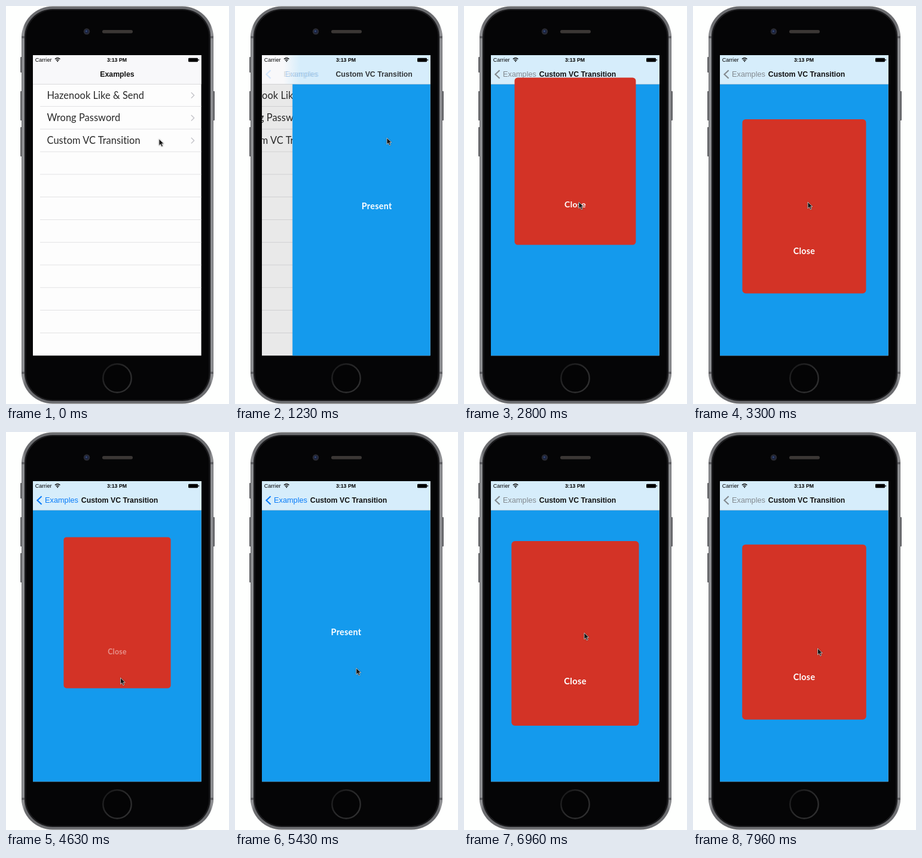
An HTML page that plays this animation: 373x664 px, repeating every 8 s.

```html
<!DOCTYPE html>
<html lang="en">
<head>
<meta charset="utf-8">
<title>Transition demo</title>
<style>
  html, body { margin: 0; width: 100%; height: 100%; overflow: hidden; background: #fefffe; }
  svg { display: block; width: 373px; height: 664px; }
  .sys { font-family: "Liberation Sans", Arial, sans-serif; }
  .row { font: 400 16.4px Lato, sans-serif; letter-spacing: .06px; fill: #2a2a2a; }
  .btn { font: 700 14.3px Lato, sans-serif; letter-spacing: .3px; fill: #fff; text-anchor: middle; }
  .title { font-size: 12.3px; font-weight: 700; text-anchor: middle; fill: #101010; }
</style>
</head>
<body>
<svg viewBox="0 0 373 664">
  <defs>
    <clipPath id="screen"><rect x="45" y="82" width="281.6" height="501.2"/></clipPath>
    <linearGradient id="metal">
      <stop offset="0" stop-color="#6a6b6e"/><stop offset=".008" stop-color="#98999c"/>
      <stop offset=".018" stop-color="#6c6d70"/><stop offset=".982" stop-color="#6c6d70"/>
      <stop offset=".992" stop-color="#98999c"/><stop offset="1" stop-color="#6a6b6e"/>
    </linearGradient>
    <linearGradient id="navFade" gradientUnits="userSpaceOnUse" x1="17" y1="0" x2="45" y2="0">
      <stop offset="0" stop-color="#d6edfb" stop-opacity="0"/><stop offset="1" stop-color="#d6edfb"/>
    </linearGradient>
    <linearGradient id="edge">
      <stop offset="0" stop-color="#000" stop-opacity="0"/><stop offset="1" stop-color="#000" stop-opacity=".05"/>
    </linearGradient>
    <linearGradient id="ring" x1="0" y1="0" x2="1" y2="1">
      <stop offset="0" stop-color="#161617"/><stop offset=".5" stop-color="#2a2a2b"/><stop offset="1" stop-color="#303031"/>
    </linearGradient>
  </defs>

  <!-- phone -->
  <g fill="#626366">
    <rect x="24" y="85" width="3" height="26" rx="1"/>
    <rect x="24" y="142" width="3" height="49" rx="1"/>
    <rect x="24" y="202" width="3" height="49" rx="1"/>
    <rect x="346" y="142" width="3" height="49" rx="1"/>
  </g>
  <rect x="26" y=".5" width="321" height="663" rx="52" fill="url(#metal)"/>
  <path d="M26 52h5M342 52h5M26 612h5M342 612h5" stroke="#5d5e61" stroke-width="3.5"/>
  <rect x="31" y="5" width="311" height="654" rx="47" fill="#1b1b1d"/>
  <rect x="33.5" y="7" width="306" height="650" rx="45" fill="#050506"/>
  <circle cx="135" cy="42.5" r="5.2" fill="#2b2c32"/>
  <circle cx="135" cy="42.5" r="3.3" fill="#1c2440"/>
  <circle cx="134.4" cy="42" r="1.2" fill="#3d5484"/>
  <rect x="161" y="40" width="51" height="5.4" rx="2.7" fill="#3b3735"/>
  <circle cx="186" cy="621" r="23.7" fill="#040405" stroke="url(#ring)" stroke-width="2.4"/>

  <g clip-path="url(#screen)">
    <rect x="45" y="82" width="282" height="502" fill="#fdfdfd"/>
    <g id="list"></g>
    <rect id="dim" x="45" y="130" width="282" height="454" fill="#000008"/>
    <g id="page">
      <rect x="41" y="130" width="4" height="454" fill="url(#edge)"/>
      <rect x="45" y="130" width="283" height="454" fill="#149aed"/>
      <text id="present" class="btn" x="186" y="338.7">Present</text>
    </g>

    <g class="sys">
      <rect x="45" y="82" width="282" height="48.5" fill="#f8f8fa"/>
      <g id="navBlue">
        <rect x="17" y="82" width="28.2" height="48.5" fill="url(#navFade)"/>
        <rect x="45" y="82" width="284" height="48.5" fill="#d6edfb"/>
      </g>
      <rect x="45" y="130" width="282" height=".5" fill="#000" opacity=".25"/>
      <text id="oldTitle" class="title" x="186" y="118.4">Examples</text>
      <path id="chevron" d="M59.6 107.2L52.4 114l7.2 6.8" fill="none" stroke-width="2.1"/>
      <text id="back" x="65" y="118.4" font-size="12.75">Examples</text>
      <text id="newTitle" class="title" x="190" y="118.4">Custom VC Transition</text>
      <text x="48.7" y="93.3" font-size="9.1">Carrier</text>
      <path d="M81.9 88.6Q86.2 84.9 90.5 88.6M83.6 90.6Q86.2 88.5 88.8 90.6"
            fill="none" stroke="#000" stroke-width="1.3"/>
      <path d="M84.7 91.8Q86.2 90.8 87.7 91.8L86.2 93.5Z"/>
      <text x="185.5" y="93.3" font-size="8.8" font-weight="700" text-anchor="middle">3:13 PM</text>
      <rect x="305" y="86.7" width="16" height="6.6" rx="1.3"/>
      <rect x="321.6" y="88.7" width="1.3" height="2.6" rx=".6"/>
    </g>

    <g id="card">
      <rect x="-103.75" y="-146" width="207.5" height="292" rx="5.5" fill="#d33326"/>
      <text id="close" class="btn" x="0" y="80.4">Close</text>
    </g>
  </g>

  <path id="cursor" d="M0 0V10.8L2.5 8.5 4.3 12.6 6.3 11.7 4.6 7.8H8Z"
        fill="#161616" stroke="#d8d8d8" stroke-width=".8" stroke-linejoin="round"
        style="filter:drop-shadow(0 .8px .8px rgba(0,0,0,.35))"/>
</svg>
<script>
const LOOP = 8000;
const el = {};
document.querySelectorAll('svg [id]').forEach(n => el[n.id] = n);
const set = (n, attrs) => { for (const k in attrs) n.setAttribute(k, attrs[k]); };
const clamp = v => Math.max(0, Math.min(1, v));

// table rows
const names = ['Hazenook Like & Send', 'Wrong Password', 'Custom VC Transition'];
let html = '';
for (let i = 0; i < 11; i++) {
  const y = 167.5 + i * 37.78;
  html += `<rect x="57" y="${y - .4}" width="270" height=".9" fill="#dfdfe1"/>`;
  if (names[i]) {
    html += `<text class="row" x="68.5" y="${y - 12.8}">${names[i].replace('&', '&amp;')}</text>` +
      `<path d="M309.8 ${y - 23.3}l4.8 4.8-4.8 4.8" fill="none" stroke="#c4c4c9" stroke-width="1.4"/>`;
  }
}
el.list.innerHTML = html;

// pointer tip: time, x, y
const path = [
  [0, 256, 222], [100, 256, 222], [260, 258.5, 222], [500, 254, 220], [1300, 254, 220],
  [1860, 200, 301], [1900, 199, 304], [2100, 192, 327], [3500, 192, 327],
  [4050, 191.5, 410], [5260, 191.5, 410], [5600, 214, 378], [6030, 201, 335],
  [7420, 201, 335], [7900, 208.5, 361], [LOOP, 208.5, 361]
];
function pointer(t) {
  const i = Math.max(1, path.findIndex(p => p[0] > t));
  const [t0, x0, y0] = path[i - 1], [t1, x1, y1] = path[i];
  let k = (t - t0) / (t1 - t0);
  k = k * k * (3 - 2 * k);
  return [x0 + (x1 - x0) * k, y0 + (y1 - y0) * k];
}

// remaining distance of an underdamped spring, s in seconds
const W = Math.sqrt(342);
function spring(s, friction) {
  const z = friction / (2 * W), wd = W * Math.sqrt(1 - z * z);
  return Math.exp(-z * W * s) * (Math.cos(wd * s) + z * W / wd * Math.sin(wd * s));
}

// progress of the page push, critically damped
function push(t) {
  const u = Math.max(0, t - 1060) * .01826;
  return t > 1860 ? 1 : 1 - (1 + u) * Math.exp(-u);
}

const shows = [{ press: 2630, open: 2683, shut: 4560, gone: 4730 },
               { press: 6560, open: 6613, shut: Infinity, gone: Infinity }];

function drawPush(t) {
  const p = push(t), off = 282 * (1 - p), late = clamp((p - .7) / .3);
  set(el.list, { transform: `translate(${-84.5 * p} 0)` });
  set(el.dim, { opacity: .095 * p });
  set(el.page, { transform: `translate(${off} 0)`, visibility: p > 0 ? 'visible' : 'hidden' });
  set(el.navBlue, { transform: `translate(${1.25 * off} 0)` });
  set(el.oldTitle, { transform: `translate(${-93 * p} 0)`, opacity: clamp(1 - 1.1 * p) });
  set(el.back, { transform: `translate(${105 * (1 - p)} 0)`, opacity: late ** 1.6 });
  set(el.chevron, { opacity: late * late });
  set(el.newTitle, { transform: `translate(${235 * (1 - p)} 0)`, opacity: p });
}

function drawCard(t) {
  const show = shows.find(s => t >= s.press && t < s.gone);
  const open = show && t >= show.open;
  set(el.present, { opacity: show && t < show.shut ? .25 + .75 * clamp((t - show.open) / 250) : 1 });
  set(el.card, { visibility: open ? 'visible' : 'hidden' });
  const tint = open && t < show.shut ? '#83898f' : '#0a7dfa';
  set(el.back, { fill: tint });
  set(el.chevron, { stroke: tint });
  if (!open) return;
  const s = (t - show.open) / 1000;
  let y = 333.7 - 502 * spring(s, 22);
  const k = spring(s, 11.1);
  let sx = 1 + .2 * k, sy = 1 + .4 * k, alpha = 1;
  if (t >= show.shut) {
    const q = ((t - show.shut) / 70) ** 1.95;
    y -= 31.4 * q;
    sx = sy = Math.max(0, 1 - .133 * q);
    alpha = .2 + .25 * (t - show.shut) / 70;
  }
  set(el.card, { transform: `translate(186 ${y}) scale(${sx} ${sy})` });
  set(el.close, { opacity: clamp(alpha) });
}

const start = performance.now();
function frame() {
  const t = (performance.now() - start) % LOOP;
  drawPush(t);
  drawCard(t);
  set(el.cursor, { transform: `translate(${pointer(t)})` });
  requestAnimationFrame(frame);
}
frame();
</script>
</body>
</html>
```
